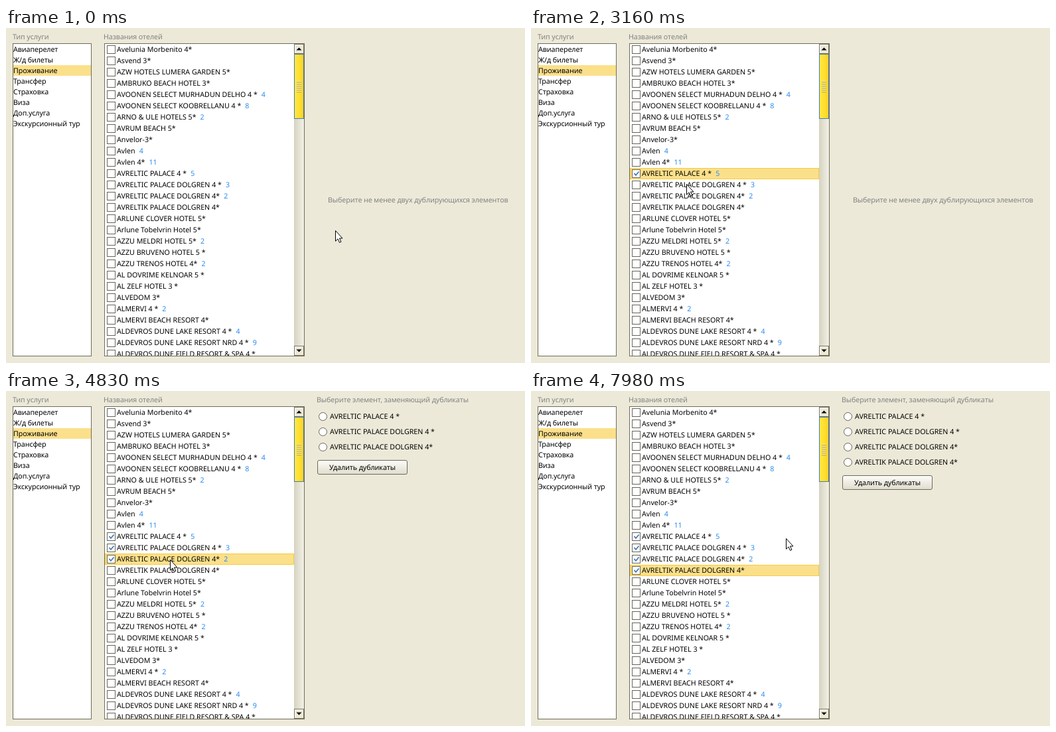
Write an HTML page that moves like this. It is 782 by 505 pixels and loops after 8 s.

```html
<!DOCTYPE html>
<html lang="ru">
<head>
<meta charset="utf-8">
<title>Удаление дубликатов</title>
<style>
  html, body { margin: 0; width: 100%; height: 100%; overflow: hidden; background: #ece9d8; }
  svg { display: block; }
  text { font: 10.7px "Noto Sans", "Open Sans", sans-serif; fill: #000; white-space: pre; text-rendering: geometricPrecision; }
  .ru { letter-spacing: -.1px; }
  .dim { fill: #828282; }
  .count { fill: #2b8af0; }
  .box { fill: #fff; stroke: #66645a; }
  .list { fill: #fff; stroke: #6f6c5c; }
  .glow { fill: #fbe08b; stroke: #f8cb3c; }
  .tick { fill: none; stroke: #4477b0; stroke-width: 1.7; }
</style>
</head>
<body>
<svg id="stage" width="782" height="505" viewBox="0 0 782 505">
  <defs>
    <linearGradient id="track"><stop stop-color="#d5d2c0"/><stop offset="1" stop-color="#f3f1e6"/></linearGradient>
    <linearGradient id="thumb"><stop stop-color="#ffea4a"/><stop offset=".5" stop-color="#ffdf30"/><stop offset="1" stop-color="#ffd122"/></linearGradient>
    <linearGradient id="face" x2="0" y2="1"><stop stop-color="#fdfdf9"/><stop offset="1" stop-color="#e0dccd"/></linearGradient>
    <clipPath id="view"><rect x="149" y="24" width="285" height="470"/></clipPath>
  </defs>
</svg>
<script>
const LOOP = 8000, STEP = 120;
const stage = document.getElementById('stage');

const services = ['Авиаперелет', 'Ж/д билеты', 'Проживание', 'Трансфер', 'Страховка',
  'Виза', 'Доп.услуга', 'Экскурсионный тур'];

// name|number of uses
const hotels = `Avelunia Morbenito 4*
Asvend 3*
AZW HOTELS LUMERA GARDEN 5*
AMBRUKO BEACH HOTEL 3*
AVOONEN SELECT MURHADUN DELHO 4 *|4
AVOONEN SELECT KOOBRELLANU 4 *|8
ARNO & ULE HOTELS 5*|2
AVRUM BEACH 5*
Anvelor-3*
Avlen|4
Avlen 4*|11
AVRELTIC PALACE 4 *|5
AVRELTIC PALACE DOLGREN 4 *|3
AVRELTIC PALACE DOLGREN 4*|2
AVRELTIK PALACE DOLGREN 4*
ARLUNE CLOVER HOTEL 5*
Arlune Tobelvrin Hotel 5*
AZZU MELDRI HOTEL 5*|2
AZZU BRUVENO HOTEL 5 *
AZZU TRENOS HOTEL 4*|2
AL DOVRIME KELNOAR 5 *
AL ZELF HOTEL 3 *
ALVEDOM 3*
ALMERVI 4 *|2
ALMERVI BEACH RESORT 4*
ALDEVROS DUNE LAKE RESORT 4 *|4
ALDEVROS DUNE LAKE RESORT NRD 4 *|9
ALDEVROS DUNE FIELD RESORT & SPA 4 *`.split('\n').map(s => s.split('|'));

// ring on, ring off, row selected
const FIRST = 11;
const clicks = [
  [2620, 2760, 2760],
  [3580, 3710, 3710],
  [4690, 4830, 4830],
  [6350, 6490, 6350]
];

// pointer moves: start time, steps, end x, end y
const start = [496, 305];
const moves = [
  [500, 3, 489, 299], [900, 2, 480, 293], [1160, 3, 423, 282], [1550, 3, 307, 248],
  [1940, 2, 240, 231], [2190, 1, 228, 223], [2330, 1, 221, 216], [2890, 2, 232, 233],
  [3160, 1, 234, 235], [3860, 2, 242, 245], [4130, 2, 247, 254], [5370, 1, 247, 257],
  [5510, 2, 253, 270], [5780, 1, 254, 270], [7090, 1, 256, 271], [7240, 1, 277, 273],
  [7400, 1, 317, 262], [7540, 2, 358, 235], [7980, 1, 384, 222]
];

function el(parent, tag, attrs = {}, text) {
  const node = document.createElementNS('http://www.w3.org/2000/svg', tag);
  for (const k in attrs) node.setAttribute(k, attrs[k]);
  if (text !== undefined) node.textContent = text;
  parent.append(node);
  return node;
}
const rect = (p, x, y, width, height, attrs) => el(p, 'rect', { x, y, width, height, ...attrs });
const label = (p, x, y, s, cls = '') => el(p, 'text', { x, y, class: cls }, s);
const path = (p, d, attrs) => el(p, 'path', { d, ...attrs });
const group = p => el(p, 'g');
const show = (node, on) => { node.style.display = on ? '' : 'none'; };

function drawServices() {
  label(stage, 10, 17, 'Тип услуги', 'ru dim');
  rect(stage, 10.5, 23.5, 118, 471, { class: 'list' });
  rect(stage, 11, 56, 117, 16, { fill: '#fbe08b' });
  services.forEach((s, i) => label(stage, 11, 36 + 16 * i, s, 'ru'));
}

function drawHotels() {
  label(stage, 147, 17, 'Названия отелей', 'ru dim');
  rect(stage, 148.5, 23.5, 301, 471, { class: 'list' });
  const view = el(stage, 'g', { 'clip-path': 'url(#view)' });
  return hotels.map(([name, count], i) => {
    const y = 24 + 17 * i;
    const glow = rect(view, 149.5, y + .5, 284, 16, { class: 'glow' });
    rect(view, 152.5, y + 2.5, 12, 12, { class: 'box' });
    const tick = path(view, `M155.5 ${y + 8}l2.5 3l4.5 -5.5`, { class: 'tick' });
    const text = label(view, 167, y + 12, name);
    if (count) el(text, 'tspan', { dx: 6, class: 'count' }, count);
    return { glow, tick };
  });
}

function drawScrollbar() {
  rect(stage, 434, 24, 15, 470, { fill: 'url(#track)' });
  for (const [y, dir] of [[24, -1], [479, 1]]) {
    rect(stage, 434.5, y + .5, 14, 14, { fill: '#ece9d8', stroke: '#77745f' });
    path(stage, `M435.5 ${y + 13}V${y + 1.5}H448`, { fill: 'none', stroke: '#fff' });
    path(stage, `M437.5 ${y + 7.5 - 2 * dir}h8l-4 ${4 * dir}z`);
  }
  rect(stage, 434.5, 39.5, 14, 97, { fill: 'url(#thumb)', stroke: '#4a78b5' });
  for (let y = 80.5; y < 98; y += 3) {
    path(stage, `M438 ${y}h7`, { stroke: '#fff3b5' });
    path(stage, `M438 ${y + 1}h7`, { stroke: '#b3a04c' });
  }
}

function drawPanel() {
  const root = group(stage);
  label(root, 468, 17, 'Выберите элемент, заменяющий дубликаты', 'ru dim');
  const options = clicks.map((c, i) => {
    const g = group(root), y = 38 + 23 * i;
    el(g, 'circle', { cx: 477.5, cy: y + .5, r: 6, class: 'box' });
    label(g, 488, y + 4, hotels[FIRST + i][0]);
    return g;
  });
  const button = group(root);
  rect(button, 469.5, .5, 135, 21, { rx: 2.5, fill: 'url(#face)', stroke: '#6c6a5c' });
  el(button, 'text', { x: 537, y: 15, class: 'ru', 'text-anchor': 'middle' }, 'Удалить дубликаты');
  return { root, options, button };
}

drawServices();
const rows = drawHotels();
drawScrollbar();
const hint = label(stage, 485, 263, 'Выберите не менее двух дублирующихся элементов', 'ru dim');
const panel = drawPanel();
const pointer = group(stage);
const ring = el(pointer, 'circle', { cx: 1.5, cy: 1.5, r: 9.7, fill: 'none', stroke: '#111' });
path(pointer, 'M.5 .5V16.3L4 12.9L6.5 18.4L8.9 17.3L6.5 12H11Z', { fill: '#fff', stroke: '#000' });

function pointerAt(t) {
  let [x, y] = start;
  for (const [from, steps, tx, ty] of moves) {
    if (t < from) break;
    const k = Math.min(1, (Math.floor((t - from) / STEP) + 1) / steps);
    x += (tx - x) * k;
    y += (ty - y) * k;
  }
  return [Math.round(x), Math.round(y)];
}

function render(t) {
  const picked = clicks.filter(c => t >= c[2]).length;
  const listed = clicks.filter(c => t >= c[0]).length;
  rows.forEach(({ glow, tick }, i) => {
    show(glow, picked && i === FIRST + picked - 1);
    show(tick, i >= FIRST && i < FIRST + picked);
  });
  show(hint, listed < 2);
  show(panel.root, listed > 1);
  panel.options.forEach((o, i) => show(o, i < listed));
  panel.button.setAttribute('transform', `translate(0 ${35 + 23 * listed})`);
  show(ring, clicks.some(([on, off]) => t >= on && t < off));
  pointer.setAttribute('transform', `translate(${pointerAt(t)})`);
}

const begin = performance.now();
function tick(now) {
  render(Math.max(0, now - begin) % LOOP);
  requestAnimationFrame(tick);
}
render(0);
requestAnimationFrame(tick);
</script>
</body>
</html>
```
